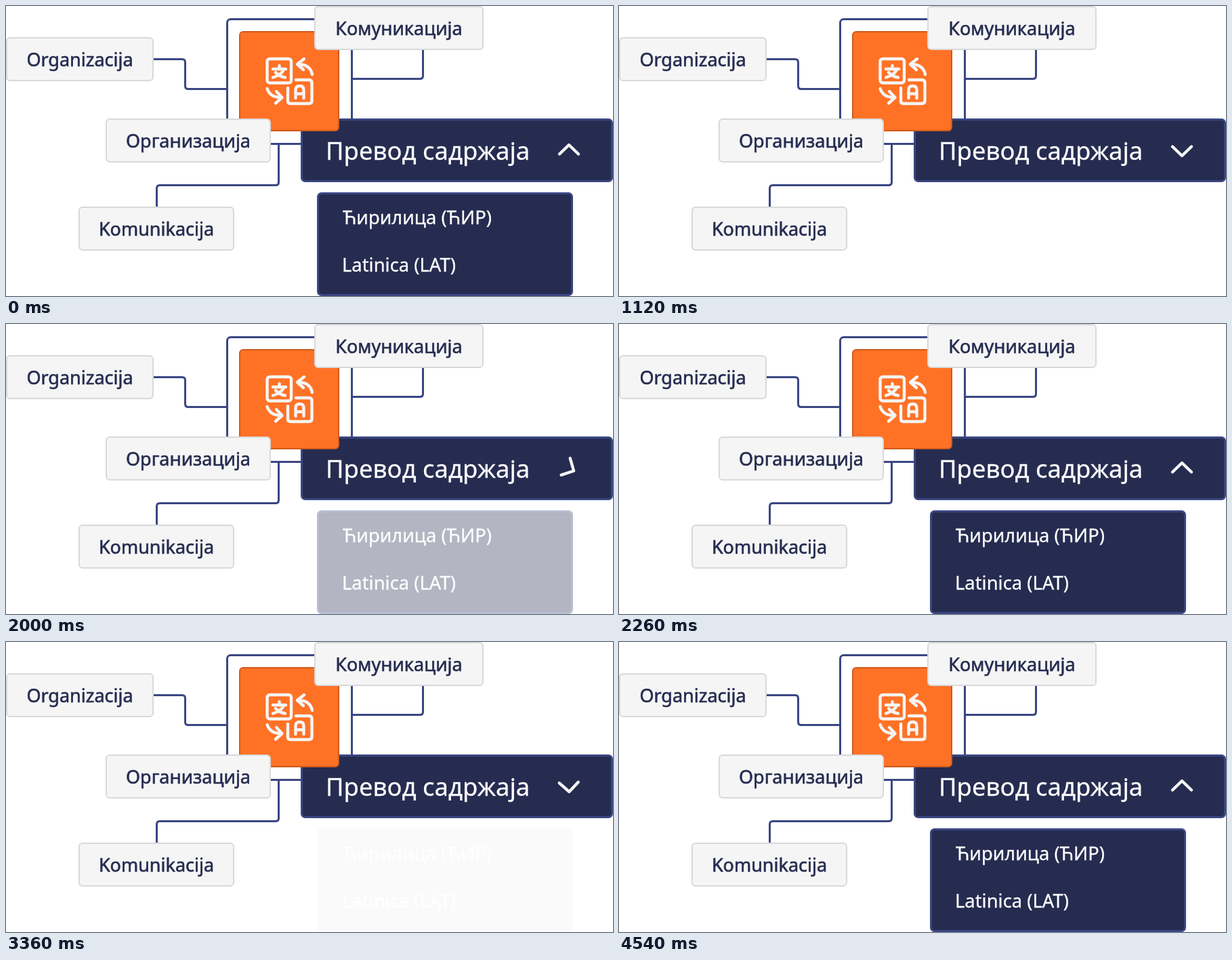
Recreate the animation shown at these times as an HTML page. Size 896x428 px, loop 4560 ms.

```html
<!DOCTYPE html>
<html lang="sr">
<head>
<meta charset="utf-8">
<style>
  html, body { margin: 0; width: 100%; height: 100%; overflow: hidden; background: #fff; }
  svg { display: block; }
  text { font: 27px "Noto Sans", "Open Sans", sans-serif; fill: #262c50; stroke: #262c50; stroke-width: 0.6; }
  .light { fill: #fff; stroke: #fff; stroke-width: 0.3; }
  .menu { font-size: 27.4px; }
  .title { font-size: 36.4px; }
  .line { fill: none; stroke: #3a4683; stroke-width: 3; }
  .dark { fill: #262c50; stroke: #3a4683; stroke-width: 3; }
  .tag { fill: #f5f5f5; stroke: #d9d9d9; stroke-width: 2; }
  .icon { fill: none; stroke: #f5f5f5; stroke-width: 4.4; stroke-linecap: round; stroke-linejoin: round; }
</style>
</head>
<body>
<svg width="896" height="428" viewBox="0 0 896 428">
  <g class="line">
    <rect x="326.5" y="19.5" width="184" height="184" rx="5"/>
    <path d="M217 78.5H260Q264.5 78.5 264.5 83V118Q264.5 122.5 269 122.5H326"/>
    <path d="M511 107.5H611Q615.5 107.5 615.5 103V64"/>
    <path d="M402.5 204V260Q402.5 264.5 398 264.5H227Q222.5 264.5 222.5 269V297"/>
  </g>

  <rect class="dark" x="436.5" y="167.5" width="458" height="91" rx="5"/>
  <text class="light title" x="472" y="227">Превод садржаја</text>
  <path id="chevron" class="icon" d="M817 218.5L831 205L845 218.5"/>

  <g id="menu">
    <rect class="dark" x="460.5" y="276.5" width="375" height="150" rx="5"/>
    <text class="light menu" x="497" y="322">Ћирилица (ЋИР)</text>
    <text class="light menu" x="496" y="392">Latinica (LAT)</text>
  </g>

  <rect x="345" y="38" width="146" height="146" rx="5" fill="#ff7226" stroke="#cf5a1c" stroke-width="2"/>
  <g class="icon">
    <rect x="385.5" y="78" width="35.5" height="35.5" rx="4"/>
    <path d="M403.5 88V92M394 93H413M410 94Q406 102 394 105.5M398 98Q403 104 412 105.5"/>
    <path d="M428 109H447Q451.5 109 451.5 113.5V140Q451.5 144 447 144H420Q416 144 416 140V121"/>
    <path d="M427.5 136V124Q427.5 118 433.5 118T439.5 124V136M428 129.5H439"/>
    <path d="M440 78L430 86L439 94M431 86Q449 86 452 101"/>
    <path d="M398 143.5L407.5 135L399 126M406 135Q390 135 385.5 122"/>
  </g>

  <g id="tags"></g>
</svg>
<script>
  const HALF = 2280, CLOSE = 800, OPEN = 1940, DURATION = 320;
  const menu = document.getElementById("menu");
  const chevron = document.getElementById("chevron");

  // x, y, width, label
  document.getElementById("tags").innerHTML = [
    [1, 47, 216, "Organizacija"],
    [456, 1, 248, "Комуникација"],
    [148, 167, 242, "Организација"],
    [108, 297, 228, "Komunikacija"]
  ].map(([x, y, w, label]) =>
    `<rect class="tag" x="${x}" y="${y}" width="${w}" height="63" rx="5"/>
     <text x="${x + w / 2}" y="${y + 42}" text-anchor="middle">${label}</text>`
  ).join("");

  const easeOut = p => 1 - (1 - p) ** 2;
  const progress = (t, start) => easeOut(Math.min(1, Math.max(0, (t - start) / DURATION)));

  function draw() {
    const t = performance.now() % HALF;
    const closed = progress(t, CLOSE) - progress(t, OPEN);
    menu.setAttribute("opacity", 1 - closed);
    chevron.setAttribute("transform", `rotate(${180 * closed} 831 213)`);
    requestAnimationFrame(draw);
  }
  draw();
</script>
</body>
</html>
```
